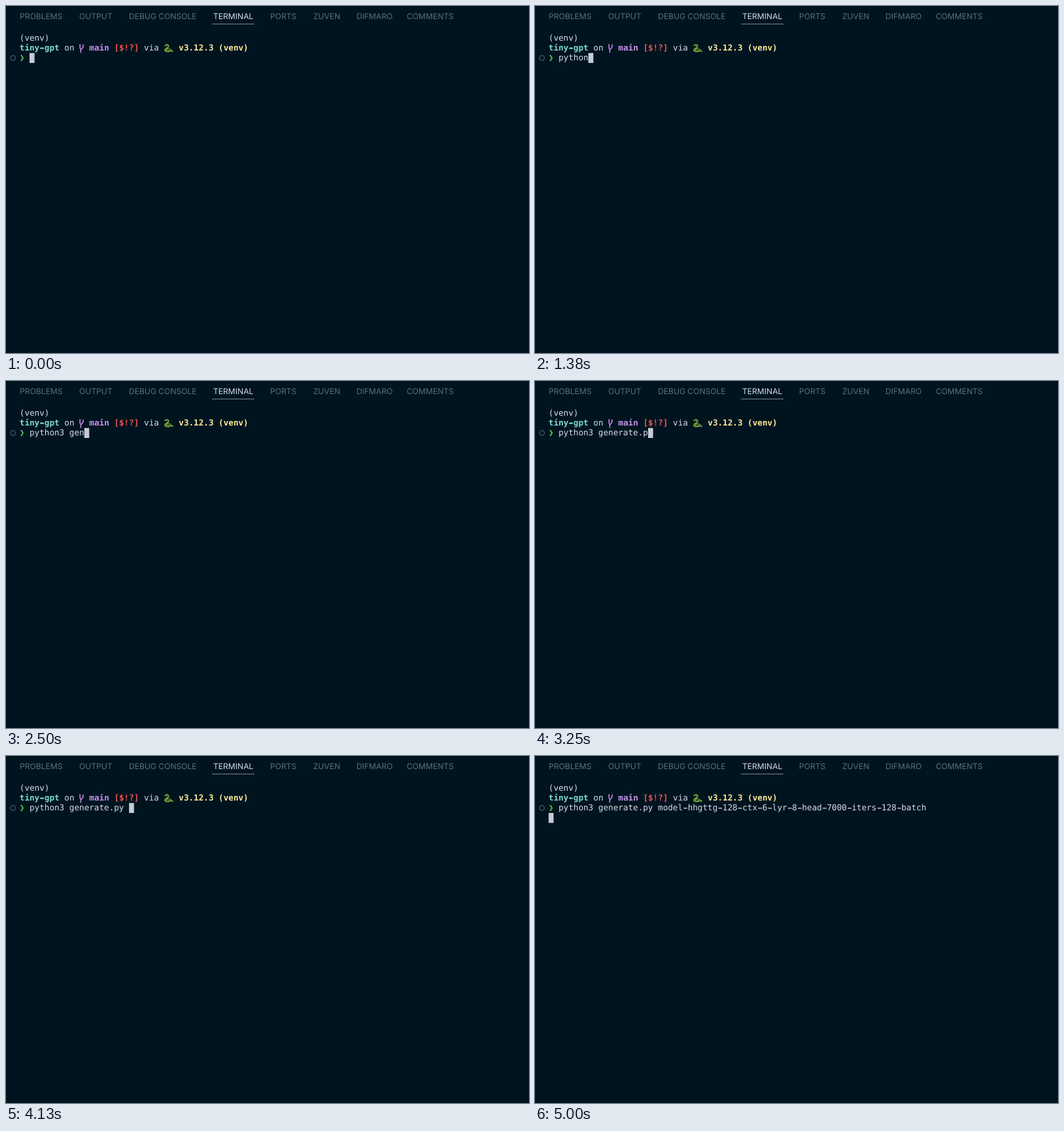
Recreate the animation shown at these times as an HTML page. Size 800 by 530 pixels, loop 8000 ms.

```html
<!DOCTYPE html>
<html lang="en">
<head>
<meta charset="utf-8">
<title>Terminal</title>
<style>
  html, body { margin: 0; width: 100%; height: 100%; overflow: hidden; background: #001420; }
  svg { display: block; }
  text { white-space: pre; text-rendering: geometricPrecision; }
  .tab { font: 12.1px Inter, sans-serif; fill: #5c6e7b; }
  .active { fill: #d3dde5; }
  .term { font: 12.64px "DejaVu Sans Mono", monospace; }
  .bold { font-weight: bold; }
</style>
</head>
<body>
<svg id="stage" width="800" height="530" viewBox="0 0 800 530">
  <clipPath id="typed"><rect id="reveal" x="36" y="70" width="0" height="19"/></clipPath>
  <g id="tabs"></g>
  <path d="M315 27.5H380" stroke="#6f8796"/>
  <g id="lines"></g>
  <!-- branch -->
  <path d="M113.2 58.3V63.5Q113.2 65.2 114.4 66.4V71.6M118 58.8V61.5Q118 63.3 115 66.4"
        fill="none" stroke="#c792ea" stroke-width="1.5"/>
  <!-- snake -->
  <g fill="none" stroke-linecap="round" stroke-linejoin="round">
    <path d="M243.6 60.4Q246.6 57.6 248.4 60.6Q249 62.6 246.4 64.2Q242.2 66.6 243.4 68.3Q246 70 250 68.8Q254.4 67.4 254.6 69.2"
          stroke="#6b9c35" stroke-width="2.3"/>
    <path d="M246.6 66.2Q249.2 64.6 252 66.6" stroke="#4e7d2b" stroke-width="1.8"/>
    <path d="M247 64.6L245 67.6M248.6 68.6H250" stroke="#c3c653" stroke-width=".8"/>
  </g>
  <circle cx="10.7" cy="79.4" r="3.7" fill="none" stroke="#485762" stroke-width="1.3"/>
  <g id="command" clip-path="url(#typed)"></g>
  <rect id="cursor" width="7.6" height="15.2" fill="#c5cbd3"/>
</svg>
<script>
const CELL = 7.61, ROW = 15.2, LEFT = 20.8, TOP = 41.4, LOOP = 8000;
const WHITE = '#d6deeb', YELLOW = '#ffeb95';
const COMMAND = 'python3 generate.py model-hhgttg-128-ctx-6-lyr-8-head-7000-iters-128-batch';
const PREFIX = 'python3 generate.py '.length;
const KEY_TIMES = [630, 750, 880, 1000, 1130, 1250, 1630, 1880, 2250, 2380,
  2500, 2630, 2750, 2880, 3000, 3050, 3130, 3250, 3380, 3630];
const PASTE = 4250, ENTER = 4880;

const $ = id => document.getElementById(id);
const colX = col => LEFT + col * CELL;
const rowY = row => TOP + row * ROW;

function add(parent, tag, attrs, content = '') {
  const el = document.createElementNS('http://www.w3.org/2000/svg', tag);
  for (const name in attrs) el.setAttribute(name, attrs[name]);
  el.textContent = content;
  parent.append(el);
}

function write(parent, col, row, content, fill, bold = false) {
  const base = rowY(row) + 11.5;
  add(parent, 'text', { x: colX(col), y: base, fill, class: bold ? 'term bold' : 'term' }, content);
  // Widen hyphens to nearly fill their cells
  const height = bold ? 1.6 : 1.05;
  [...content].forEach((char, i) => {
    if (char === '-') add(parent, 'rect',
      { x: colX(col + i) + .8, y: base - 3.46 - height / 2, width: 6, height, fill });
  });
}

[['PROBLEMS', 21], ['OUTPUT', 112], ['DEBUG CONSOLE', 188], ['TERMINAL', 317], ['PORTS', 404],
 ['ZUVEN', 470], ['DIFMARO', 536], ['COMMENTS', 613]].forEach(([label, x]) =>
  add($('tabs'), 'text', { x, y: 20.3, class: label === 'TERMINAL' ? 'tab active' : 'tab' }, label));

[[0, 0, '(venv)', WHITE],
 [0, 1, 'tiny-gpt', '#7fdbca', true],
 [9, 1, 'on', WHITE],
 [14, 1, 'main', '#c792ea', true],
 [19, 1, '[$!?]', '#ef5350', true],
 [25, 1, 'via', WHITE],
 [32, 1, 'v3.12.3 (venv)', YELLOW, true],
 [0, 2, '❯', '#5ad450', true]].forEach(line => write($('lines'), ...line));
write($('command'), 2, 2, COMMAND, WHITE);

function draw(now) {
  const t = now % LOOP;
  const count = t >= PASTE ? COMMAND.length : Math.min(PREFIX, KEY_TIMES.filter(k => k <= t).length);
  const entered = t >= ENTER;
  $('reveal').setAttribute('width', count * CELL);
  $('cursor').setAttribute('x', colX(entered ? 0 : 2 + count));
  $('cursor').setAttribute('y', rowY(entered ? 3 : 2));
  requestAnimationFrame(draw);
}
draw(0);
</script>
</body>
</html>
```
